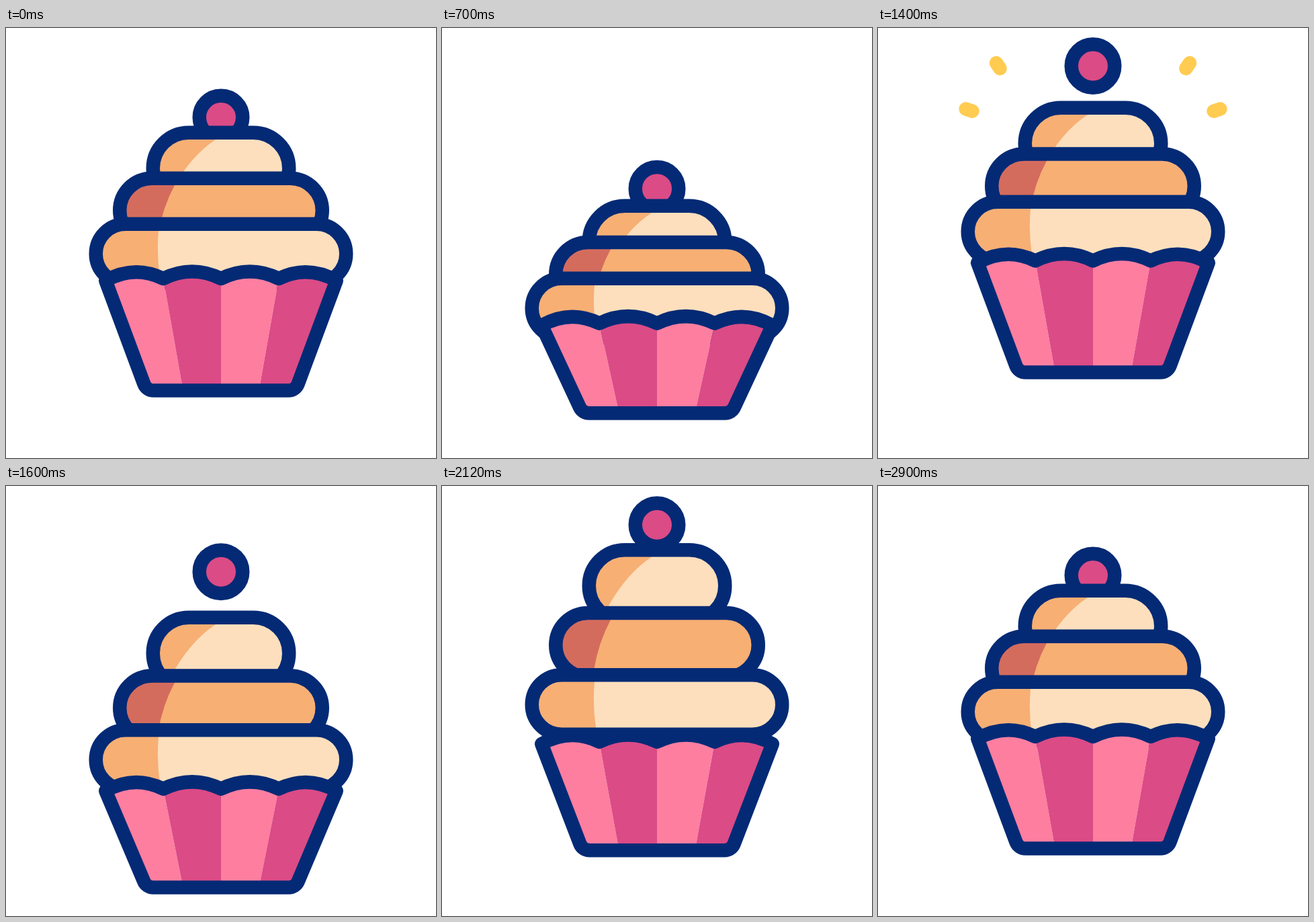
An HTML page with a canvas that plays this animation: 640x640 px, repeating every 3600 ms.

```html
<!DOCTYPE html>
<html lang="en">
<head>
<meta charset="utf-8">
<title>Bouncing cupcake</title>
<style>
  html, body { margin: 0; width: 100%; height: 100%; overflow: hidden; background: #fff; }
  canvas { display: block; }
</style>
</head>
<body>
<canvas id="stage" width="640" height="640"></canvas>
<script>
const ctx = document.getElementById('stage').getContext('2d');
const LOOP = 3600;
const LINE = 20.5;
const NAVY = '#042a75', LIGHT = '#fddfbd', ORANGE = '#f7af74', RUST = '#d46c5e',
      PINK = '#fe7ea0', MAGENTA = '#db4b86', YELLOW = '#ffcb51';

// Turning points of the bounce. Each layer reaches them `lag` ms after the one below.
// `pull` above 1 makes the move towards the pose start slowly, like a fall.
const REST = { lag: 0, pull: 1, base: 0, rim: 0, cream: 0, cherry: 0 };
const poses = [
  { ...REST, at: 220 },
  { at: 530, lag: 0, pull: 1, base: 57, rim: 91, cream: 128.5, cherry: 127 },
  { at: 1080, lag: 55, pull: 1, base: -49, rim: -41, cream: -37.5, cherry: -76.5 },
  { at: 1600, lag: 18, pull: 2.5, base: 58, rim: 80, cream: 84, cherry: 85 },
  { at: 1885, lag: 55, pull: 1, base: 0, rim: 4, cream: -61, cherry: -78 },
  { at: 2420, lag: 16, pull: 1, base: 6.5, rim: 17, cream: 33, cherry: 47 },
  { ...REST, at: 2900 }
];

const mix = (a, b, u) => a + (b - a) * u;
const progress = (t, from, to) => Math.min(1, Math.max(0, (t - from) / (to - from)));
const smooth = u => (1 - Math.cos(Math.PI * u)) / 2;

// Layers: 0 cup base, 1 cup rim, 2 to 4 creams, 5 cherry; creams are spread evenly above the rim
function height(pose, layer) {
  if (layer === 0) return pose.base;
  if (layer === 5) return pose.cherry;
  return mix(pose.rim, pose.cream, (layer - 1) / 3);
}

function offset(layer, t) {
  const when = pose => pose.at + pose.lag * layer;
  const next = poses.findIndex(pose => when(pose) > t);
  if (next < 1) return 0;
  const from = poses[next - 1], to = poses[next];
  const u = smooth(progress(t, when(from), when(to)) ** to.pull);
  return mix(height(from, layer), height(to, layer), u);
}

function outline(path) {
  ctx.strokeStyle = NAVY;
  ctx.lineWidth = LINE;
  ctx.stroke(path);
}

// left and top are the inner edge; the shade covers everything left of a curve
function cream(left, top, radius, fill, shade, curve) {
  const half = LINE / 2;
  const body = new Path2D();
  body.roundRect(left - half, top - half, 2 * (320 - left) + LINE, 2 * radius + LINE, radius + half);
  ctx.save();
  ctx.clip(body);
  ctx.fillStyle = fill;
  ctx.fillRect(0, top - 20, 640, 160);
  const [x0, cx, cy, x1, y1] = curve;
  ctx.beginPath();
  ctx.moveTo(left - 30, top - 20);
  ctx.lineTo(x0, top - 20);
  ctx.lineTo(x0, top);
  ctx.quadraticCurveTo(cx, top + cy, x1, top + y1);
  ctx.lineTo(x1, top + y1 + 30);
  ctx.lineTo(left - 30, top + y1 + 30);
  ctx.fillStyle = shade;
  ctx.fill();
  ctx.restore();
  outline(body);
}

function cup(rim, base) {
  const step = 85.9, left = 320 - 2 * step, foot = 111;
  const body = new Path2D();
  body.moveTo(left, rim + 3);
  for (let i = 1; i <= 4; i++) {
    const x = left + i * step;
    body.quadraticCurveTo(x - step / 2, rim - 21, x, i < 4 ? rim : rim + 3);
  }
  body.arcTo(320 + foot, base, 320, base, 15);
  body.arcTo(320 - foot, base, left, rim + 3, 15);
  body.closePath();

  ctx.save();
  ctx.clip(body);
  for (let i = 0; i < 4; i++) {
    const x = left + i * step;
    const footX = k => 320 + (k - 2) * 56.5;
    ctx.beginPath();
    ctx.moveTo(x, rim - 20);
    ctx.lineTo(x + step, rim - 20);
    ctx.lineTo(x + step, rim);
    ctx.lineTo(footX(i + 1), base);
    ctx.lineTo(footX(i), base);
    ctx.lineTo(x, rim);
    ctx.fillStyle = i % 2 ? MAGENTA : PINK;
    ctx.fill();
  }
  ctx.restore();
  outline(body);
}

function cherry(y) {
  const body = new Path2D();
  body.arc(320, y, 32.25, 0, Math.PI * 2);
  ctx.fillStyle = MAGENTA;
  ctx.fill(body);
  outline(body);
}

function sparks(t) {
  const head = 1 - (1 - progress(t, 1120, 1330)) ** 2;
  const tail = smooth(progress(t, 1240, 1480));
  if (head <= 0 || tail >= 1) return;
  ctx.strokeStyle = YELLOW;
  ctx.lineWidth = LINE;
  for (const [x0, y0, x1, y1] of [[171, 133.5, 130.6, 120.5], [199, 86, 176, 52]]) {
    for (const side of [-1, 1]) {
      const at = u => [320 + side * (320 - mix(x0, x1, u)), mix(y0, y1, u)];
      ctx.beginPath();
      ctx.moveTo(...at(tail));
      ctx.lineTo(...at(head));
      ctx.stroke();
    }
  }
}

function draw(t) {
  const [base, rim, lower, middle, upper, top] = [0, 1, 2, 3, 4, 5].map(i => offset(i, t));
  ctx.fillStyle = '#fff';
  ctx.fillRect(0, 0, 640, 640);
  ctx.lineCap = ctx.lineJoin = 'round';
  sparks(t);
  cherry(133 + top);
  cream(229, 166 + upper, 43, LIGHT, ORANGE, [312, 274, 25, 245, 78]);
  cream(179.5, 234 + middle, 37.5, ORANGE, RUST, [251, 233, 33, 226, 75]);
  cream(144, 302 + lower, 34, LIGHT, ORANGE, [227, 224, 34, 229, 68]);
  cup(373 + rim, 539.5 + base);
}

const start = performance.now();
function tick() {
  draw((performance.now() - start) % LOOP);
  requestAnimationFrame(tick);
}
tick();
</script>
</body>
</html>
```
